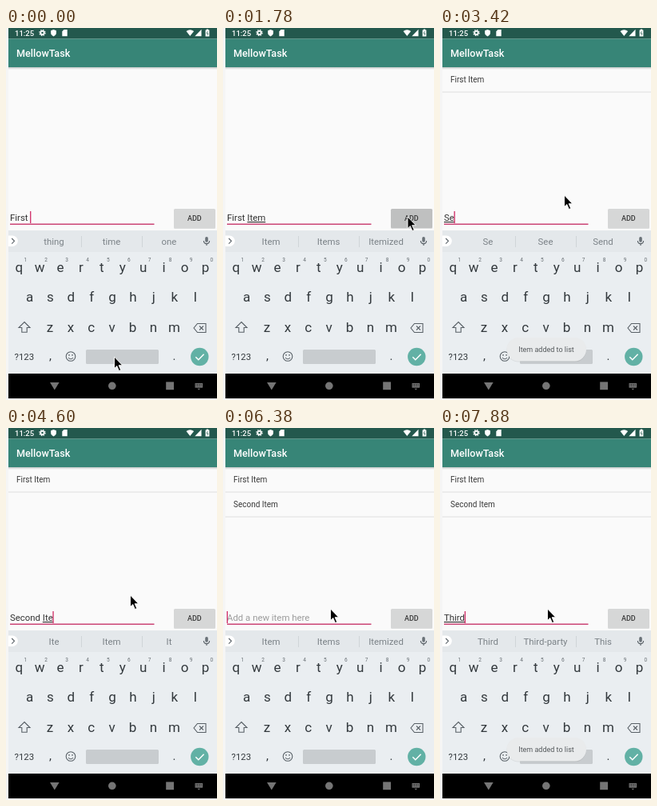
An HTML page that plays this animation: 264 by 465 pixels, repeating every 8 s.

```html
<!DOCTYPE html>
<html lang="en">
<head>
<meta charset="utf-8">
<style>
  html, body { margin: 0; width: 100%; height: 100%; overflow: hidden; background: #f5f5f5; }
  svg { display: block; width: 264px; height: 465px; }
  text { font-family: Roboto, sans-serif; white-space: pre; }
  .mid { text-anchor: middle; }
  .item { font-size: 10px; fill: #3a3a3a; }
  .edit { font-size: 11.4px; fill: #333; }
  .word { font-size: 11.4px; fill: #7b8287; }
  .key { font-size: 17px; fill: #33393d; }
  .digit { font-size: 6.5px; fill: #666d72; }
  .line { fill: none; stroke: #596167; stroke-width: 1.1; }
</style>
</head>
<body>
<svg viewBox="0 0 264 465">
  <defs>
    <linearGradient id="fade" x2="0" y2="1">
      <stop offset="0" stop-color="#c4c8c8"/>
      <stop offset="1" stop-color="#fafafa"/>
    </linearGradient>
  </defs>
  <rect x="3" width="261" height="462" fill="#fafafa"/>

  <!-- status and title bars -->
  <rect x="3" width="261" height="13.5" fill="#23584d"/>
  <rect x="3" y="13.5" width="261" height="35.5" fill="#378577"/>
  <rect x="3" y="49" width="261" height="3" fill="url(#fade)"/>
  <text x="11" y="9.8" font-size="9.5" font-weight="500" fill="#fff">11:25</text>
  <g fill="#fff">
    <circle cx="45.5" cy="6" r="2.2" fill="none" stroke="#fff" stroke-width="1.8"/>
    <circle cx="45.5" cy="6" r="3.6" fill="none" stroke="#fff" stroke-width="1.2" stroke-dasharray="1.5 1.33"/>
    <path d="M59.5 2l3.4 1.3v2.7q0 3-3.4 4.4q-3.4-1.4-3.4-4.4v-2.7z"/>
    <path d="M72.5 2h4.2v8.2h-6.4v-6z"/>
    <path d="M225.5 4q4.8-3.6 9.6 0l-4.8 6z"/>
    <path d="M244.5 1.8v8.4h-8.2z"/>
    <path d="M250.8 1.6h2.4v1h1.2v7.8h-4.8v-7.8h1.2z"/>
  </g>
  <path d="M252.4 4l-1.4 2.8h2l-1 2.4" fill="none" stroke="#23584d" stroke-width=".7"/>
  <text x="13" y="36.2" font-size="12.6" font-weight="500" fill="#fff">MellowTask</text>

  <!-- list -->
  <g class="row"><text class="item" x="13" y="68">First Item</text><path d="M3 80h261" stroke="#dedede"/></g>
  <g class="row"><text class="item" x="13" y="99.3">Second Item</text><path d="M3 111h261" stroke="#dedede"/></g>

  <!-- input -->
  <text id="hint" class="edit" x="5" y="241" style="fill:#9b9b9b">Add a new item here</text>
  <text id="edit" class="edit" x="5" y="241"><tspan></tspan><tspan text-decoration="underline"></tspan></text>
  <path d="M5 245.2h180.5" stroke="#cb4576" stroke-width="1.5"/>
  <rect id="caret" y="229" width="1.3" height="15" fill="#d02c66"/>
  <rect x="210" y="227.5" width="52" height="23.5" rx="1.5" fill="#c9caca" opacity=".6"/>
  <rect id="add" x="210" y="226" width="52" height="24" rx="1.5"/>
  <text class="mid" x="235.8" y="241" font-size="9" font-weight="500" fill="#3a3a3a">ADD</text>

  <!-- keyboard -->
  <rect x="3" y="253" width="261" height="27" fill="#e4e8eb"/>
  <rect x="3" y="280" width="261" height="152" fill="#eaeef1"/>
  <path d="M3 259.5h5a6.7 6.7 0 0 1 0 13.6h-5z" fill="#fff"/>
  <path d="M7.2 263l3.3 3.3l-3.3 3.3" class="line" stroke-width="1.3"/>
  <g id="words">
    <text class="word mid" x="60" y="271"></text>
    <text class="word mid" x="132" y="271"></text>
    <text class="word mid" x="204" y="271"></text>
    <path d="M94.5 260v14M170.5 260v14" stroke="#d0d5d8"/>
  </g>
  <rect x="249.2" y="261" width="3.6" height="6.8" rx="1.8" fill="#697177"/>
  <path d="M247.4 266q0 3.6 3.6 3.6t3.6-3.6M251 269.6v2.4" class="line"/>
  <g id="keys"></g>
  <path d="M23 367.5l7 7h-3.8v5.8h-6.4v-5.8h-3.8z" class="line"/>
  <path d="M239.5 369.5h10.5v11h-10.5l-4.5-5.5zM242 372.5l5 5m0-5l-5 5" class="line"/>
  <circle cx="81" cy="410.5" r="5.8" class="line"/>
  <path d="M78 412q3 3.6 6 0" class="line"/>
  <g fill="#596167"><circle cx="79" cy="408.8" r=".9"/><circle cx="83" cy="408.8" r=".9"/></g>
  <rect x="100" y="402" width="91" height="18" rx="1.5" fill="#c8cccf"/>
  <circle cx="242.3" cy="411" r="11.2" fill="#62b1a5"/>
  <path d="M237.3 411.2l3.5 3.5l6.8-7" fill="none" stroke="#fff" stroke-width="1.5"/>

  <!-- navigation bar -->
  <rect x="3" y="432" width="261" height="31" fill="#000"/>
  <g fill="#757575">
    <path d="M55 443h11.6l-5.8 9.6z"/>
    <circle cx="132.8" cy="447.3" r="4.8"/>
    <rect x="200.2" y="442.4" width="9.8" height="9.8"/>
    <rect x="236.5" y="444" width="9.6" height="5.6"/>
    <path d="M239.5 450.8h3.6l-1.8 1.8z"/>
  </g>
  <path d="M237.5 445.6h8M237.5 447.2h8" stroke="#000" stroke-width=".7" stroke-dasharray=".9 .7"/>

  <g id="toast">
    <rect x="83.5" y="388" width="99.5" height="29.5" rx="14.7" fill="#000" opacity=".07"/>
    <rect x="83.5" y="387" width="99.5" height="29.5" rx="14.7" fill="#e9ebec"/>
    <text class="mid" x="133" y="404.6" font-size="9" fill="#55595c">Item added to list</text>
  </g>
  <path id="mouse" d="M0 0v14.6l3.3-3.1l2.6 6l2.3-1l-2.6-5.8h4.7z" stroke="#fff" stroke-width=".9"/>
</svg>
<script>
const LOOP = 8000;
const $ = id => document.getElementById(id);

// each track: [start ms, value]; a value holds until the next start
const text = [
  [0, "First "], [290, "First I"], [440, "First It"], [590, "First Ite"], [740, "First Item"], [1930, ""],
  [3120, "S"], [3420, "Se"], [3570, "Sec"], [3720, "Secon"], [3860, "Second "],
  [4160, "Second I"], [4460, "Second It"], [4600, "Second Ite"], [4750, "Second Item"], [6090, ""],
  [7130, "T"], [7280, "Th"], [7430, "Thi"], [7580, "Thir"], [7880, "Third"]
];
const words = [
  [0, "thing time one"], [290, "I I'm It"], [440, "It Its Item"], [590, "Ite Item It"], [740, "Item Items Itemized"], [2230, ""],
  [3120, "S So See"], [3420, "Se See Send"], [3570, "Sec Second Secret"], [3720, "Secon Second Seconds"], [3860, "one time half"],
  [4160, "I I'm It"], [4460, "It Its Item"], [4600, "Ite Item It"], [4750, "Item Items Itemized"], [6680, ""],
  [7130, "T The This"], [7280, "Th The This"], [7430, "Thi This Think"], [7580, "Thir Third Thirty"], [7880, "Third Third-party This"]
];
const caret = [[0, 1], [1340, 0], [1930, 1], [2380, 0], [2820, 1], [5200, 0], [5790, 1], [6530, 0], [7130, 1]];
const toast = [
  [0, 0], [2230, .12], [2380, .45], [2530, .8], [2680, 1], [4160, .5], [4310, 0],
  [6530, .12], [6680, .5], [6830, 1]
];
const button = [[0, "#d6d7d7"], [1780, "#bfc0c0"], [1930, "#cbcccc"], [2080, "#d6d7d7"],
  [5940, "#bfc0c0"], [6090, "#cbcccc"], [6230, "#d6d7d7"]];
const mouse = [
  [0, [135.5, 411]], [1040, [146.5, 380]], [1190, [200, 296]], [1340, [231, 236]], [2080, [196, 223]], [2230, [155.5, 209]],
  [5490, [188, 220]], [5640, [231, 236]], [6230, [180, 231]], [6380, [134.5, 226]]
];
const rows = [[0, 0], [1930, 1], [6090, 2]];
const at = (track, t) => track.findLast(step => step[0] <= t)[1];

function key(label, x, y, size = 17) {
  return `<text class="key mid" x="${x}" y="${y}" style="font-size:${size}px">${label}</text>`;
}
const keyRow = (letters, x, y) => [...letters].map((c, i) => key(c, x + i * 25.9, y)).join("");
$("keys").innerHTML =
  keyRow("qwertyuiop", 16.3, 305) + keyRow("asdfghjkl", 29.5, 342) + keyRow("zxcvbnm", 55, 380) +
  [..."1234567890"].map((d, i) => `<text class="digit mid" x="${24.3 + i * 25.9}" y="292">${d}</text>`).join("") +
  key("?123", 22.8, 414.8, 11.4) + key(",", 55.5, 415, 15) + key(".", 210.5, 415, 15);

const [plain, typing] = $("edit").children;
const slots = $("words").querySelectorAll("text");
const items = document.querySelectorAll(".row");

function draw(t) {
  const s = at(text, t), cut = s.lastIndexOf(" ") + 1;
  plain.textContent = s.slice(0, cut);
  typing.textContent = s.slice(cut);
  $("hint").style.opacity = s ? 0 : 1;
  $("caret").setAttribute("x", 4.7 + (s ? $("edit").getComputedTextLength() : 0));
  $("caret").style.opacity = at(caret, t);

  const list = at(words, t).split(" ");
  slots.forEach((slot, i) => slot.textContent = list[i] || "");
  $("words").style.opacity = list[0] ? 1 : 0;

  items.forEach((item, i) => item.style.opacity = i < at(rows, t) ? 1 : 0);
  $("add").setAttribute("fill", at(button, t));
  $("toast").style.opacity = at(toast, t);
  $("mouse").setAttribute("transform", `translate(${at(mouse, t)})`);
}

const start = performance.now();
function tick() {
  draw((performance.now() - start) % LOOP);
  requestAnimationFrame(tick);
}
tick();
</script>
</body>
</html>
```
